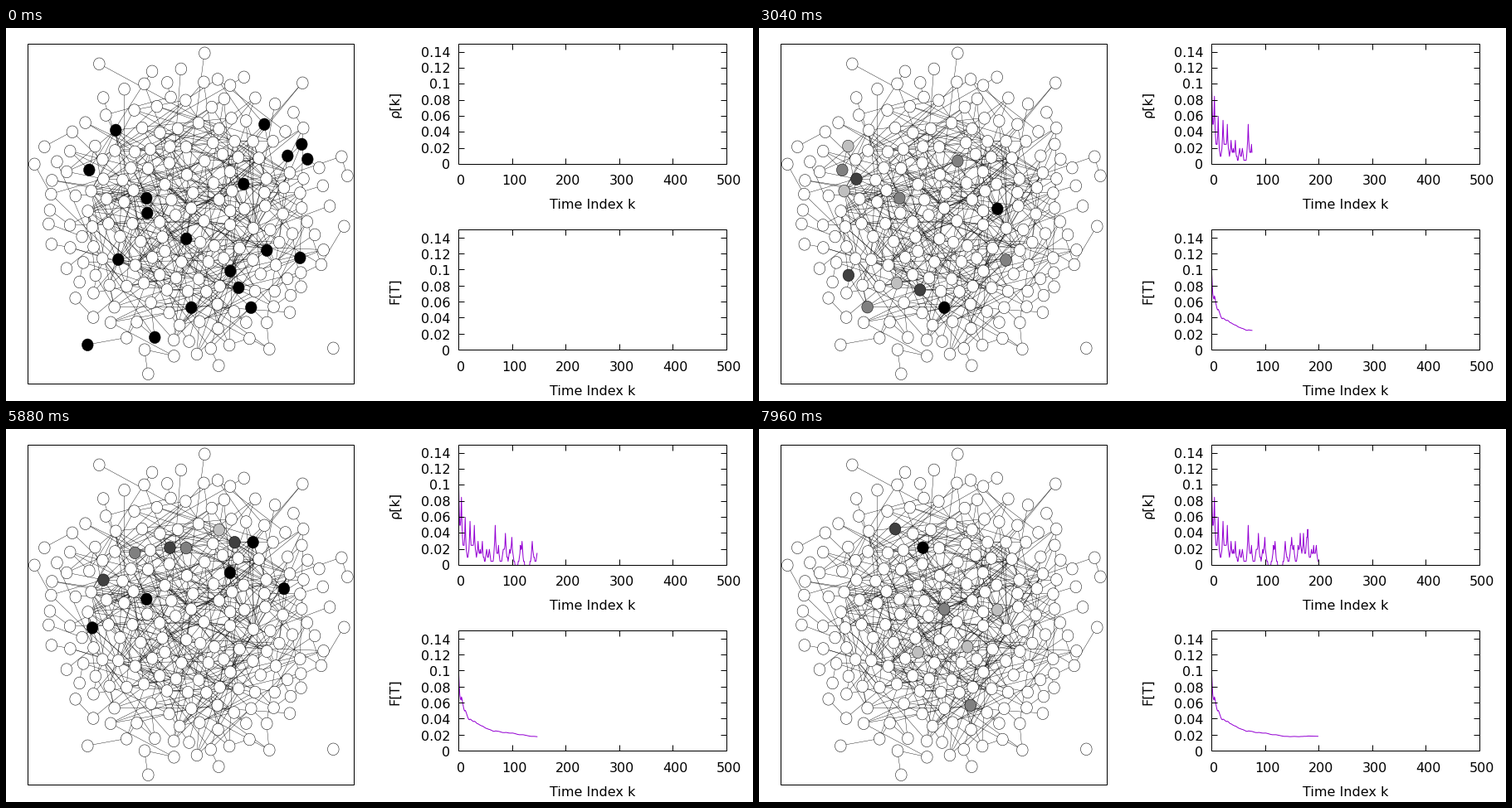
Write a matplotlib script that moves like this. It is 900 by 450 pixels and loops after 8 s.

```python
import random
import numpy as np
import matplotlib.pyplot as plt
from matplotlib.animation import FuncAnimation
from matplotlib.collections import EllipseCollection, LineCollection

W, H, DPI = 900, 450, 72
FRAMES, STEP = 200, 40
NODES, LINKS, REST = 200, 430, 4
SHADES = ["0", "0.25", "0.5", "0.75", "1"]
PURPLE = "#9400d3"
FONT = {"family": "DejaVu Sans", "size": 16, "color": "black"}
rng = random.Random(11)

# The first burst and a few stragglers; all other nodes are scattered by rule.
START = [(132, 123), (100, 171), (169, 205), (170, 223), (135, 279), (179, 373),
         (217, 254), (223, 337), (270, 293), (280, 313), (295, 337), (314, 268),
         (354, 277), (339, 154), (311, 116), (286, 188), (356, 140), (363, 158),
         (98, 382)]
STRAY = [(394, 386), (112, 43), (357, 66), (239, 30), (34, 164), (46, 143),
         (404, 155), (411, 178), (407, 239), (171, 417), (256, 407), (317, 387)]
LONER = len(START)
CENTRE, RADII = np.array([221, 221]), np.array([172, 176])

# Peak time and height of each wave of firing.
WAVES = [(0, 19), (5, 15), (12, 11), (21, 10), (25, 3), (29, 9), (36, 5), (40, 3),
         (44, 5), (52, 4), (57, 4), (68, 10), (74, 4), (83, 3), (87, 8), (95, 3),
         (99, 7), (115, 4), (118, 5), (137, 6), (141, 1), (147, 3), (149, 5),
         (153, 4), (161, 4), (165, 7), (171, 7), (177, 4), (179, 7), (186, 3),
         (190, 4), (195, 5)]


def place_nodes():
    """Scatter nodes evenly over an ellipse, each far from the others."""
    pts = np.array(START + STRAY, float)
    while len(pts) < NODES:
        tries = []
        for _ in range(60):
            a, r = rng.uniform(0, 2 * np.pi), rng.random() ** 0.54
            tries.append(CENTRE + RADII * r * (np.cos(a), np.sin(a)))
        gaps = [np.hypot(*(pts - p).T).min() for p in tries]
        pts = np.vstack([pts, tries[int(np.argmax(gaps))]])
    return pts


def link_nodes(pts):
    """Random links, rarer over long distances and near the rim."""
    rad = np.hypot(*((pts - CENTRE) / RADII).T)
    weight = np.clip(1.25 - rad ** 2, 0.25, 0.75)
    weight[LONER] = 0
    i, j = np.triu_indices(NODES, 1)
    dist = np.hypot(*(pts[i] - pts[j]).T)
    odds = weight[i] * weight[j] * np.exp(-dist / 70)
    picks = rng.choices(range(len(i)), weights=odds.tolist(), k=LINKS)
    links = {(int(i[p]), int(j[p])) for p in picks}
    joined = {n for link in links for n in link}
    for n in set(range(NODES)) - joined - {LONER}:
        d = np.hypot(*(pts - pts[n]).T) + 200 * (rad >= rad[n])
        links.add((n, int(rng.choice(np.argsort(d)[:5]))))
    return sorted(links)


def fire_all(links):
    """Age of each node's last firing at every step, and the counts."""
    near = {n: set() for n in range(NODES)}
    for a, b in links:
        near[a].add(b)
        near[b].add(a)
    k = np.arange(FRAMES)
    goal = np.rint(sum(h * 0.6 ** abs(k - peak) for peak, h in WAVES)).astype(int)
    last = np.full(NODES, -99)
    ages, counts = [], []
    fired = list(range(len(START)))
    for t in range(FRAMES):
        if t:
            touched = {m for n in fired for m in near[n]}
            free = [n for n in range(NODES) if n != LONER and t - last[n] >= REST]
            rng.shuffle(free)
            free.sort(key=lambda n: n not in touched)
            fired = free[:goal[t]]
        last[fired] = t
        ages.append(np.clip(t - last, 0, REST))
        counts.append(len(fired))
    return ages, np.array(counts)


nodes = place_nodes()
links = link_nodes(nodes)
ages, counts = fire_all(links)
density = counts / NODES
average = np.cumsum(density) / np.arange(1, FRAMES + 1)

fig = plt.figure(figsize=(W / DPI, H / DPI), dpi=DPI, facecolor="white")
ax = fig.add_axes([0, 0, 1, 1])
ax.set(xlim=(0, W), ylim=(H, 0))
ax.axis("off")


def frame_box(x0, y0, x1, y1):
    ax.add_patch(plt.Rectangle((x0, y0), x1 - x0, y1 - y0, fill=False,
                               ec="black", lw=1, zorder=5, snap=False))


def tick(x, y, dx, dy):
    ax.plot([x, x + dx], [y, y + dy], color="black", lw=1, zorder=5,
            solid_capstyle="butt", snap=False)


def label(x, y, text, ha="center"):
    ax.text(x, y, text, ha=ha, va="baseline", **FONT)


LEFT, RIGHT, TALL, TOP_VALUE = 545.5, 868.5, 145, 0.15


def chart(top, name, drop):
    """Draw one empty chart and return its curve."""
    base = top + TALL
    frame_box(LEFT, top, RIGHT, base)
    for i in range(8):
        y = base - i * 0.02 / TOP_VALUE * TALL
        if i:
            row = np.floor(y) + 0.5
            tick(LEFT, row, 7, 0)
            tick(RIGHT, row, -7, 0)
        label(535.5, y + 5.5 + drop, f"{i * 0.02:.2g}", "right")
    for i in range(6):
        x = LEFT + i * (RIGHT - LEFT) / 5
        if 0 < i < 5:
            column = np.floor(x) + 0.5
            tick(column, base, 0, -7)
            tick(column, top, 0, 7)
        label(x + 2.5, base + 24.5 + drop, str(i * 100))
    label(707, base + 53.5 + drop, "Time Index k")
    ax.text(469, top + 72.5 + drop, name, rotation=90, ha="center", va="center", **FONT)
    return ax.plot([], [], color=PURPLE, lw=1, zorder=4)[0]


frame_box(26.5, 19.5, 419.5, 429.5)
ax.add_collection(LineCollection([nodes[list(e)] for e in links],
                                 colors="black", linewidths=0.4, zorder=1))
dots = EllipseCollection(np.full(NODES, 13.6), np.full(NODES, 14.6), np.zeros(NODES),
                         units="xy", offsets=nodes + 0.3,
                         offset_transform=ax.transData,
                         edgecolors="black", linewidths=0.5, zorder=2)
ax.add_collection(dots)
TOPS = (19.5, 243.5)
curves = [chart(TOPS[0], "ρ[k]", 0), chart(TOPS[1], "F[T]", 1)]


def draw(k):
    dots.set_facecolor([SHADES[a] for a in ages[k]])
    xs = LEFT + np.arange(k) * (RIGHT - LEFT) / 500
    for curve, top, values in zip(curves, TOPS, (density, average)):
        curve.set_data(xs, top + TALL - values[:k] / TOP_VALUE * TALL)
    return [dots, *curves]


anim = FuncAnimation(fig, draw, frames=FRAMES, interval=STEP, repeat=True,
                     repeat_delay=0, init_func=lambda: draw(0))
plt.show()
```
